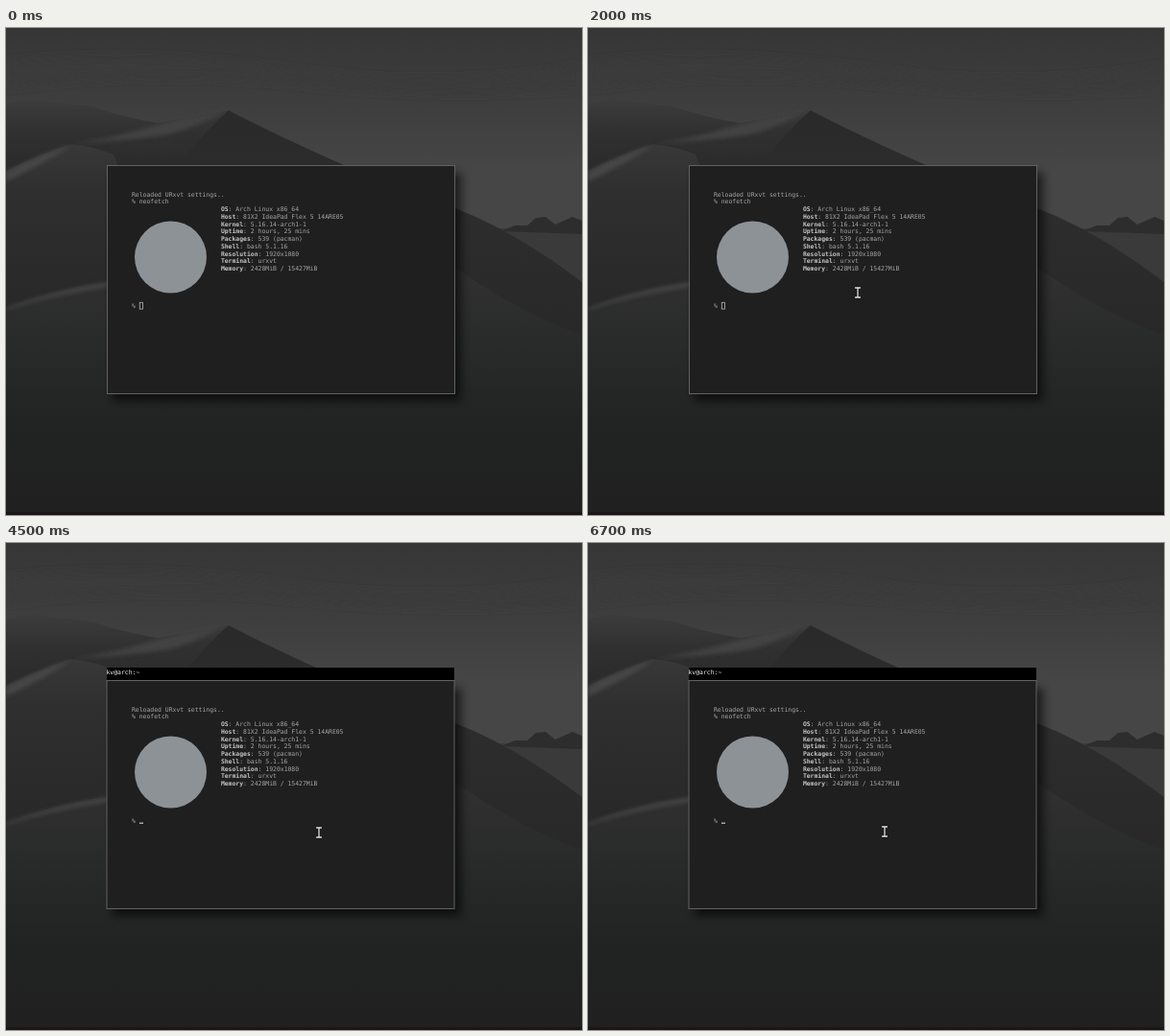
Write an HTML page that moves like this. It is 600 by 508 pixels and loops after 8000 ms.

```html
<!DOCTYPE html>
<html lang="en">
<head>
<meta charset="utf-8">
<title>Terminal on the dunes</title>
<style>
  html, body { margin: 0; width: 100%; height: 100%; overflow: hidden; background: #222; }
  svg { display: block; width: 600px; height: 508px; }
  text { font: 6.43px "DejaVu Sans Mono", monospace; fill: #a6a6a6; white-space: pre; text-rendering: geometricPrecision; }
  .key { font-weight: bold; fill: #c4c4c4; }
  .title { fill: #f2f2f2; }
</style>
</head>
<body>
<svg viewBox="0 0 600 508">
  <defs>
    <linearGradient id="sky" x2="0" y2="1">
      <stop offset="0" stop-color="#363636"/>
      <stop offset=".3" stop-color="#3e3e3e"/>
      <stop offset=".55" stop-color="#464646"/>
      <stop offset="1" stop-color="#464646"/>
    </linearGradient>
    <linearGradient id="far" gradientUnits="userSpaceOnUse" x1="0" y1="74" x2="0" y2="145">
      <stop offset="0" stop-color="#3c3c3c"/>
      <stop offset=".5" stop-color="#303030"/>
      <stop offset="1" stop-color="#2b2b2b"/>
    </linearGradient>
    <linearGradient id="shade" gradientUnits="userSpaceOnUse" x1="0" y1="86" x2="0" y2="330">
      <stop offset="0" stop-color="#2a2a2a"/>
      <stop offset=".45" stop-color="#2d2d2d"/>
      <stop offset="1" stop-color="#282828"/>
    </linearGradient>
    <linearGradient id="near" gradientUnits="userSpaceOnUse" x1="0" y1="122" x2="0" y2="280">
      <stop offset="0" stop-color="#383838"/>
      <stop offset=".3" stop-color="#2f2f2f"/>
      <stop offset="1" stop-color="#292929"/>
    </linearGradient>
    <linearGradient id="floor" gradientUnits="userSpaceOnUse" x1="0" y1="262" x2="0" y2="508">
      <stop offset="0" stop-color="#303030"/>
      <stop offset=".28" stop-color="#292a2a"/>
      <stop offset=".6" stop-color="#222323"/>
      <stop offset="1" stop-color="#202020"/>
    </linearGradient>
    <filter id="soft" x="-20%" y="-50%" width="140%" height="200%"><feGaussianBlur stdDeviation="5"/></filter>
    <filter id="glow" x="-20%" y="-50%" width="140%" height="200%"><feGaussianBlur stdDeviation="2"/></filter>
  </defs>

  <rect width="600" height="270" fill="url(#sky)"/>
  <path d="M0 36Q150 22 300 44T600 40V62Q450 74 300 58T0 62Z" fill="#3a3a3a" filter="url(#soft)"/>
  <path d="M440 209H600V280H440Z" fill="#3a3a3a"/>
  <path d="M515 212L530 206 543 206 552 198 562 197 572 205 590 197 600 201V215Z" fill="#2d2d2d"/>
  <path d="M0 80Q18 73 40 76L90 82Q125 94 158 99L232 86 290 140 240 220H0Z" fill="url(#far)"/>
  <path d="M68 121Q110 115 150 103T232 86Q200 101 180 108T68 121Z" fill="#424242" filter="url(#glow)"/>
  <path d="M232 86Q280 111 352 143L468 188Q530 212 600 265V350H180V143Q208 106 232 86Z" fill="url(#shade)"/>
  <path d="M0 149Q35 131 68 121Q90 123 112 132L180 300H0Z" fill="url(#near)"/>
  <path d="M0 150Q35 132 68 122Q46 138 0 160Z" fill="#505050" filter="url(#glow)" opacity=".7"/>
  <path d="M0 292Q48 272 112 264L468 250Q540 300 600 320V508H0Z" fill="url(#floor)"/>
  <path d="M0 292Q48 274 106 265V270Q48 279 0 294Z" fill="#4c4c4c" filter="url(#glow)" opacity=".75"/>
  <rect y="505" width="600" height="3" fill="#1b1517"/>

  <rect x="111" y="151" width="363" height="238" fill="#000" opacity=".6" filter="url(#soft)"/>
  <rect id="frame" x="105.5" y="143.5" width="362" height="238" fill="#1f1f1f" stroke="#626262"/>
  <g id="bar">
    <rect x="105" y="130" width="362" height="13" fill="#000"/>
    <text class="title" x="104.5" y="137.4">kv@arch:~</text>
  </g>
  <circle cx="171.5" cy="239" r="37.5" fill="#8d9297"/>
  <g id="lines"></g>
  <rect id="hollow" x="139.3" y="286.3" width="3.2" height="6.8" fill="none" stroke="#b5b5b5" stroke-width=".8"/>
  <rect id="under" x="139" y="291.6" width="4" height="1.2" fill="#c8c8c8"/>

  <g id="cross" fill="none" stroke-linecap="square">
    <path d="M-3.7 -3.4L3.7 3.4M3.7 -3.4L-3.7 3.4" stroke="#d8d8d8" stroke-width="4"/>
    <path d="M-3.7 -3.4L3.7 3.4M3.7 -3.4L-3.7 3.4" stroke="#050505" stroke-width="2.3"/>
  </g>
  <g id="beam" fill="none">
    <path d="M-2.5 -5H2.5M0 -5V5M-2.5 5H2.5" stroke="#111" stroke-width="3"/>
    <path d="M-2.9 -5H2.9M0 -5V5M-2.9 5H2.9" stroke="#e4e4e4" stroke-width="1.3"/>
  </g>
</svg>
<script>
const LOOP = 8000, STEP = 100, FOCUS = 3200;
const COL = 3.87, ROW = 7.75, LEFT = 131, TOP = 175.7;
const $ = id => document.getElementById(id);

function print(row, col, words, key) {
  const t = document.createElementNS("http://www.w3.org/2000/svg", "text");
  t.setAttribute("x", LEFT + col * COL);
  t.setAttribute("y", TOP + row * ROW);
  if (key) t.setAttribute("class", "key");
  t.textContent = words;
  $("lines").append(t);
}

print(0, 0, "Reloaded URxvt settings..");
print(1, 0, "% neofetch");
print(15, 0, "%");
[
  ["OS", "Arch Linux x86_64"],
  ["Host", "81X2 IdeaPad Flex 5 14ARE05"],
  ["Kernel", "5.16.14-arch1-1"],
  ["Uptime", "2 hours, 25 mins"],
  ["Packages", "539 (pacman)"],
  ["Shell", "bash 5.1.16"],
  ["Resolution", "1920x1080"],
  ["Terminal", "urxvt"],
  ["Memory", "2428MiB / 15427MiB"]
].forEach(([key, value], i) => {
  print(i + 2, 24, key, true);
  print(i + 2, 24 + key.length, ": " + value);
});

// Pointer stops: time, x, y
const path = [
  [1200, 10, 100], [1300, 64, 134], [1400, 128, 176], [1500, 196, 222],
  [1600, 250, 256], [1700, 281, 276], [2300, 281, 276], [2700, 306, 291],
  [3000, 326, 302], [4700, 326, 302], [4800, 326, 303], [5200, 326, 303],
  [5400, 319, 302], [5700, 309, 301], [LOOP, 309, 301]
];

function pointerAt(t) {
  const i = path.findIndex(p => p[0] > t);
  if (i < 1) return null;
  const [t0, x0, y0] = path[i - 1], [t1, x1, y1] = path[i];
  const k = (t - t0) / (t1 - t0);
  return [Math.round(x0 + (x1 - x0) * k), Math.round(y0 + (y1 - y0) * k)];
}

const show = (id, on) => $(id).style.display = on ? "" : "none";

function draw(now) {
  const t = Math.floor((now % LOOP) / STEP) * STEP;
  const focused = t >= FOCUS;
  show("bar", focused);
  show("under", focused);
  show("hollow", !focused);
  $("frame").setAttribute("x", focused ? 105 : 105.5);

  const p = pointerAt(t);
  const inside = p && p[0] > 105 && p[1] > 143;
  show("cross", p && !inside);
  show("beam", inside);
  if (p) $(inside ? "beam" : "cross").setAttribute("transform", `translate(${p})`);
}

const start = performance.now();
function tick() {
  draw(performance.now() - start);
  requestAnimationFrame(tick);
}
tick();
</script>
</body>
</html>
```
